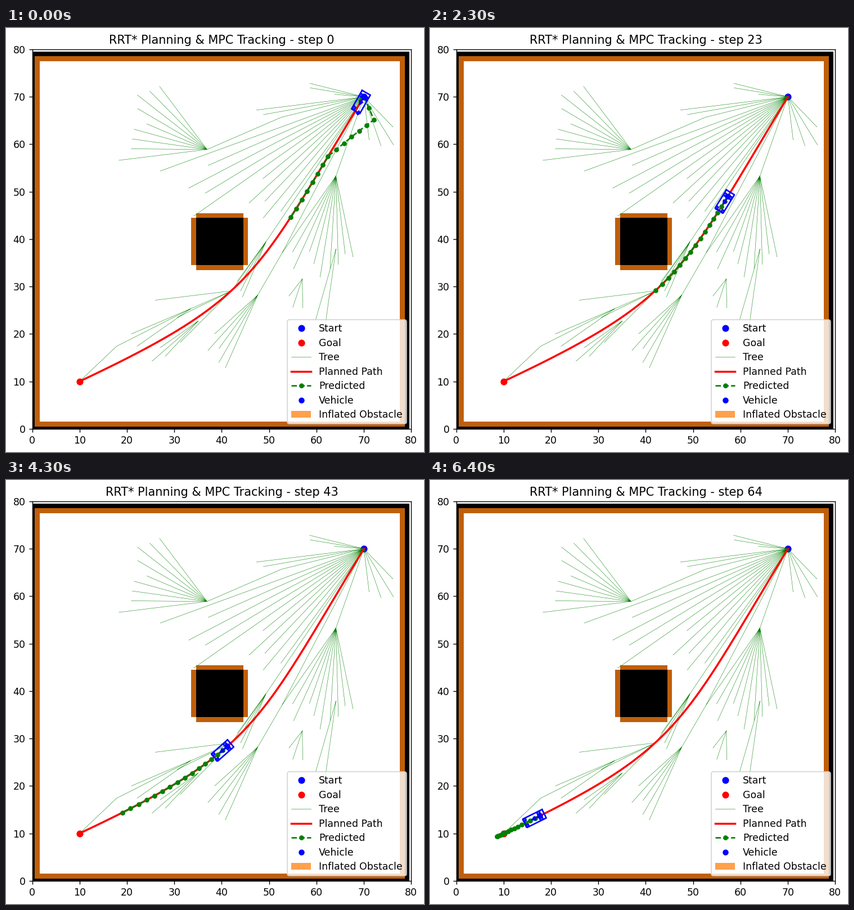
Recreate the animation shown at these times as a matplotlib script. Size 743 by 753 pixels, loop 6.5 s.

```python
import numpy as np
import matplotlib.pyplot as plt
from matplotlib.animation import FuncAnimation
from matplotlib.colors import to_rgb
from matplotlib.patches import Patch, Polygon

W, H, DPI = 743, 753, 125
STEPS = 65
SIDE = 673.75
ROOT, GOAL = np.array([70.0, 70.0]), np.array([10.0, 10.0])
HORIZON = np.arange(16)
rng = np.random.default_rng(4)

fig = plt.figure(figsize=(W / DPI, H / DPI), dpi=DPI)
ax = fig.add_axes([46.6 / W, 41.2 / H, SIDE / W, SIDE / H])

# ---- map: walls, a square block, and both grown by one cell ----
wall = np.ones((80, 80), bool)
wall[1:-1, 1:-1] = False
wall[35:45, 35:45] = True
grown = wall.copy()
for axis in (0, 1):
    for shift in (-1, 1):
        grown |= np.roll(wall, shift, axis)
grid = np.ones((80, 80, 3))
grid[grown] = to_rgb("#c05f0a")
grid[wall] = 0
ax.imshow(grid, origin="lower", interpolation="nearest", aspect="auto")
ax.set(xlim=(0, 80), ylim=(0, 80))
ax.set_xticks(range(0, 81, 10))
ax.set_yticks(range(0, 81, 10))

# ---- search tree ----
tree = []


def direction(deg):
    return np.array([np.cos(np.radians(deg)), np.sin(np.radians(deg))])


def link(*pts):
    tree.extend([*pts, (np.nan, np.nan)])


def fan(hub, n, angles, lengths):
    """Spread n branches over an angle range, with random lengths."""
    for a in np.linspace(*angles, n):
        link(hub, hub + rng.uniform(*lengths) * direction(a))


NORTH, EAST = (36.9, 58.9), (64.1, 53.3)
MID, LOW, BEND, WEST = (49.3, 39.4), (47.6, 28.2), (42.1, 29.1), (33.4, 25.3)

link(ROOT, (52.6, 65.7), NORTH)
link(ROOT, EAST)
link(ROOT, MID, BEND, WEST, (17.8, 17.4), GOAL)
link(ROOT, (52.7, 37), LOW)
fan(ROOT, 2, (187, 190), (20, 23))
fan(ROOT, 5, (200, 215), (35, 46))
fan(ROOT, 5, (219, 234), (26, 34))
fan(ROOT, 4, (-83, -46), (7, 12))
fan(ROOT, 3, (166, 175), (5, 12))
fan(NORTH, 9, (127, 187), (13, 19))
fan(EAST, 10, (-78, -125), (15, 22))
fan((64.1, 37.9), 2, (-98, -106), (15, 17))
fan((57, 31.6), 3, (-89, -128), (4, 7))
fan(MID, 4, (-113, -126), (8, 18))
fan(LOW, 5, (-114, -138), (12, 17))
fan(BEND, 3, (-173, -135), (8, 17))
fan(WEST, 2, (203, 215), (13, 15))
fan((35, 22.7), 3, (215, 227), (8, 13))

# ---- planned path: one cubic curve, continued a little past the goal ----
t = np.linspace(0, 1, 600)[:, None]
P1, P2 = np.array([47.4, 27.6]), np.array([47.3, 32.7])
path = ((1 - t)**3 * ROOT + 3 * t * (1 - t)**2 * P2
        + 3 * t**2 * (1 - t) * P1 + t**3 * GOAL)
track = np.vstack([path, GOAL - 0.08 * (P1 - GOAL)])
arc = np.r_[0, np.cumsum(np.hypot(*np.diff(track, axis=0).T))]


def arc_at_x(x):
    return np.interp(-x, -track[:, 0], arc)


def on_track(s):
    return np.column_stack([np.interp(s, arc, c) for c in track.T])


# ---- vehicle motion: swerve, return, then cruise along the path ----
SPEED = 1.32
JOIN, SWERVE = 17, 9
JOIN_ARC, END_ARC = arc_at_x(61.45), arc_at_x(8.65)
SWERVE_POS = np.array([64.8, 65.5])
JOIN_POS = on_track([JOIN_ARC])[0]
START_V, SWERVE_V, JOIN_V = (v * direction(a) for v, a in
                             ((0.36, 242), (SPEED, 222), (SPEED, 241.5)))
ALONG = (P2 - ROOT) / np.hypot(*(P2 - ROOT))
ACROSS = np.array([-ALONG[1], ALONG[0]])


def hermite(k, n, a, va, b, vb):
    u = k / n
    return ((2 * u**3 - 3 * u**2 + 1) * a + (u**3 - 2 * u**2 + u) * n * va
            + (3 * u**2 - 2 * u**3) * b + (u**3 - u**2) * n * vb)


def cruise_arc(k):
    return JOIN_ARC + SPEED * (k - JOIN)


def position(k):
    if k < SWERVE:
        return hermite(k, SWERVE, ROOT, START_V, SWERVE_POS, SWERVE_V)
    if k < JOIN:
        return hermite(k - SWERVE, JOIN - SWERVE, SWERVE_POS, SWERVE_V,
                       JOIN_POS, JOIN_V)
    return on_track([cruise_arc(k)])[0]


def yaw_at(k, h=0.25):
    dx, dy = position(k + h) - position(max(k - h, 0))
    return np.arctan2(dy, dx)


def steer_at(k):
    ds = np.hypot(*(position(k + 0.5) - position(k)))
    turn = yaw_at(k + 0.5) - yaw_at(k)
    return np.clip(np.arctan(WHEELBASE * turn / ds), -0.35, 0.65)


# ---- predicted horizon ----
def predicted(k):
    gain = np.interp(k, [0, SWERVE, JOIN, 49], [1.12, 1.02, 0.93, 1])
    go = gain * (1.97 * HORIZON - 3.08 * (1 - np.exp(-HORIZON / 4)))
    if k < JOIN:
        # leave from beside the path, swing out and merge onto it
        offset = position(k) - ROOT
        fade = 0.5 + 0.5 * np.cos(np.pi * np.minimum(HORIZON / 7, 1))
        kick = np.interp(k, [0, SWERVE, JOIN], [4.3, -0.8, 0])
        side = offset @ ACROSS * fade + kick * np.interp(HORIZON, [0, 2, 8], [0, 1, 0])
        return on_track(offset @ ALONG + go) + side[:, None] * ACROSS
    # brake towards the goal over the last steps
    s = cruise_arc(k)
    left = END_ARC - s
    stop = left * (1 - (1 - HORIZON / 15)**1.8)
    mix = np.clip((k - 50) / 14, 0, 1)
    return on_track(s + (1 - mix) * np.minimum(go, left) + mix * stop)


# ---- car shape, rear axle at the origin ----
WHEELBASE, TREAD = 3.3, 0.7
GAP = np.full((1, 2), np.nan)


def box(x0, x1, y0, y1):
    return np.array([(x0, y0), (x1, y0), (x1, y1), (x0, y1), (x0, y0)])


def rotate(pts, a):
    c, s = np.cos(a), np.sin(a)
    return pts @ np.array([[c, s], [-s, c]])


BODY = box(-1, 3.5, -1, 1)
WHEELS = [box(-0.3, 0.3, y - 0.2, y + 0.2) for y in (-TREAD, TREAD)]
SHAFT = np.array([(0, 0), (1.2, 0)])
HEAD = np.array([(1.1, -0.42), (1.95, 0), (1.1, 0.42)])


def car_lines(steer):
    parts = [BODY, GAP, SHAFT]
    for wheel in WHEELS:
        parts += [GAP, wheel, GAP, rotate(wheel, steer) + [WHEELBASE, 0]]
    return np.vstack(parts)


# ---- artists ----
start, = ax.plot(*ROOT, "bo", label="Start")
goal, = ax.plot(*GOAL, "ro", label="Goal")
branches, = ax.plot(*np.array(tree).T, color="green", lw=0.3, label="Tree")
plan, = ax.plot(*path.T, "r-", lw=2, label="Planned Path")
ahead, = ax.plot([], [], "--o", color="green", ms=4, label="Predicted")
dot, = ax.plot([], [], "bo", ms=5, label="Vehicle")
car, = ax.plot([], [], "b-", lw=1.5)
tip = ax.add_patch(Polygon(HEAD, fc="blue", ec="blue", lw=1, zorder=3))
inflated = Patch(color="#ffa04d", lw=0, label="Inflated Obstacle")
ax.legend(handles=[start, goal, branches, plan, ahead, dot, inflated],
          loc="lower right", labelspacing=0.43)
title = ax.set_title("")


def draw(k):
    pos, yaw = position(k), yaw_at(k)
    ahead.set_data(*predicted(k).T)
    dot.set_data([pos[0]], [pos[1]])
    car.set_data(*(rotate(car_lines(steer_at(k)), yaw) + pos).T)
    tip.set_xy(rotate(HEAD, yaw) + pos)
    title.set_text(f"RRT* Planning & MPC Tracking - step {k}")
    return ahead, dot, car, tip, title


anim = FuncAnimation(fig, draw, frames=STEPS, interval=100, repeat=True,
                     repeat_delay=0, init_func=lambda: draw(0))
plt.show()
```
